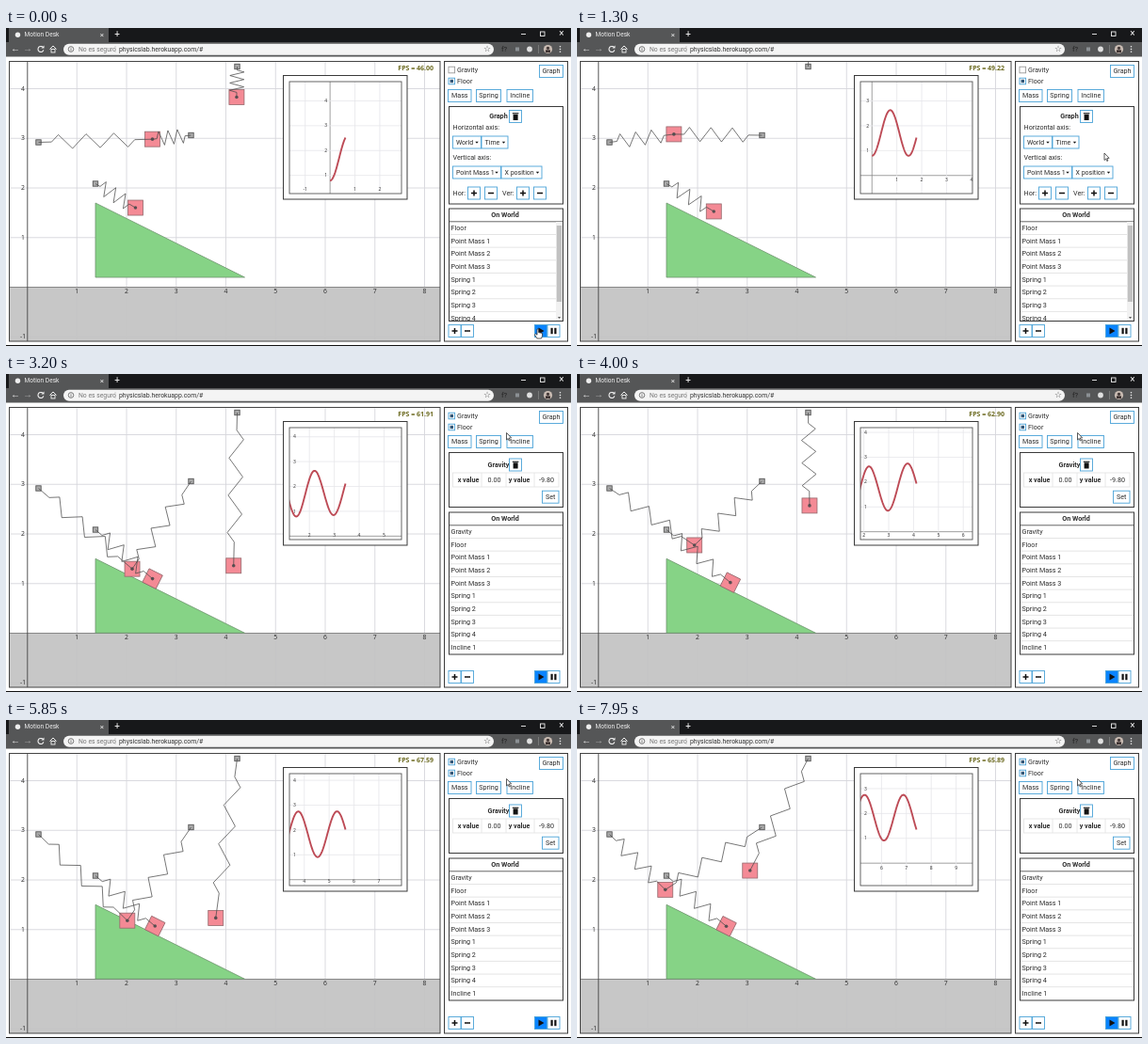
Write an HTML page with a canvas that moves like this. It is 600x338 px and loops after 8000 ms.

```html
<!DOCTYPE html>
<html lang="es">
<head>
<meta charset="utf-8">
<title>Motion Desk</title>
<style>
html, body { margin: 0; width: 100%; height: 100%; overflow: hidden; background: #fff; }
canvas { display: block; width: 600px; height: 338px; }
</style>
</head>
<body>
<canvas id="stage" width="600" height="338"></canvas>
<script>
const ctx = document.getElementById('stage').getContext('2d');
const LOOP = 8000, STEP = 50, UNIT = 52.75, GRAPH_UNIT = 26.4;
const UI = 'Roboto, sans-serif', AXIS = '"Open Sans", sans-serif';
const BLUE = '#4ba3d8', FRAME = '#3a3a3a', GRID = '#d6d6dc';
const GRAVITY_ON = 2400, FALL = 2.83;

const worldX = x => 22.5 + UNIT * x;
const worldY = y => 275.5 - UNIT * y;
const clamp = (v, lo = 0, hi = 1) => Math.min(hi, Math.max(lo, v));
const smooth = u => u * u * (3 - 2 * u);
const range = (from, to) => Array.from({ length: to - from + 1 }, (_, i) => from + i);

// Simulated seconds; the simulation slows down a little under gravity.
const clock = ms => .62 + .0009 * ms - .000067 * Math.max(0, ms - 2450);

// Smooth curve through one value per moment of the fall.
const MOMENTS = [FALL, 4.11, 4.96, 6.35, 7.41];
function through(values, t) {
  const last = MOMENTS.length - 1;
  const i = clamp(MOMENTS.findLastIndex(m => m <= t), 0, last - 1);
  const slope = k => {
    const a = Math.max(k - 1, 0), b = Math.min(k + 1, last);
    return (values[b] - values[a]) / (MOMENTS[b] - MOMENTS[a]);
  };
  const h = MOMENTS[i + 1] - MOMENTS[i], u = clamp((t - MOMENTS[i]) / h), w = 1 - u;
  return smooth(w) * values[i] + smooth(u) * values[i + 1] + u * w * h * (w * slope(i) - u * slope(i + 1));
}
const sagPhase = [.8, 4.47, 7.57, 11.67, 14.33];
const bobPhase = [.52, 4.77, 7.33, 11.89, 14.6];
const bobAngle = [-.03, .01, .243, -.53, -.48];

function swing(s) {
  const halfTurns = Math.min(1.3605 * s, .194 + 1.28 * s);
  return 1.71 + .12 * clamp((s - 2.2) / 1.6) - .92 * Math.cos(Math.PI * halfTurns);
}
function middleMass(s) {
  const drift = Math.max(0, (s - 1.8) / 1.03);
  const y = s < FALL ? 2.93 + .085 * s - .66 * drift ** 2 : 1.95 + .8 * Math.cos(through(sagPhase, s));
  return [worldX(swing(s)), worldY(y)];
}
function hangingMass(s) {
  const falling = s >= FALL, angle = falling ? through(bobAngle, s) : -.03;
  const length = falling
    ? 1.98 - 1.3 * Math.cos(through(bobPhase, s))
    : -1.55 * Math.sin(Math.PI * (s - .84) / 1.68);
  return [worldX(4.235 + length * Math.sin(angle)), worldY(4.45 - length * Math.cos(angle))];
}
function slidingMass(s) {
  const x = s < FALL
    ? 140 + 7 * Math.cos(1.94 + 3.1 * (s - .62))
    : 162 + 4 * Math.cos(3.1 * (s - 4.11) - 1.32) - 30 * Math.exp(4 * (FALL - s));
  const free = 192.3 + .5 * (x - 140), resting = 221.7 + .55 * (x - 163);
  return [x, free + (resting - free) * clamp((s - FALL) / .3)];
}

function box(x, y, w, h, fill, stroke, width = 1) {
  if (fill) { ctx.fillStyle = fill; ctx.fillRect(x, y, w, h); }
  if (stroke) { ctx.strokeStyle = stroke; ctx.lineWidth = width; ctx.strokeRect(x, y, w, h); }
}
function line(points, color, width = 1, fill) {
  ctx.beginPath();
  points.forEach(([x, y]) => ctx.lineTo(x, y));
  if (fill) { ctx.closePath(); ctx.fillStyle = fill; ctx.fill(); }
  if (color) { ctx.strokeStyle = color; ctx.lineWidth = width; ctx.stroke(); }
}
const across = (x0, x1, y, color, width) => line([[x0, y], [x1, y]], color, width);
const down = (x, y0, y1, color, width) => line([[x, y0], [x, y1]], color, width);
function dot(x, y, r, fill, stroke) {
  ctx.beginPath();
  ctx.arc(x, y, r, 0, 7);
  if (fill) { ctx.fillStyle = fill; ctx.fill(); }
  if (stroke) { ctx.strokeStyle = stroke; ctx.lineWidth = 1; ctx.stroke(); }
}
function text(s, x, y, { size = 7.2, weight = 400, align = 'left', color = '#2c2c2c', family = UI } = {}) {
  ctx.font = `${weight} ${size}px ${family}`;
  ctx.textAlign = align;
  ctx.textBaseline = 'middle';
  ctx.fillStyle = color;
  ctx.fillText(s, x, y + .3);
}
const centered = (s, x, y, style) => text(s, x, y, { align: 'center', ...style });
function clipped(x, y, w, h, draw) {
  ctx.save();
  ctx.beginPath();
  ctx.rect(x, y, w, h);
  ctx.clip();
  draw();
  ctx.restore();
}

function drawBrowser() {
  const icon = { size: 10, color: '#f2f2f2' };
  box(0, 0, 600, 15, '#17181a');
  box(3, 0, 106, 15, '#555657');
  dot(12.5, 7.2, 2.7, '#eee');
  text('Motion Desk', 19.5, 7.2, { size: 6.6, color: '#eee' });
  centered('×', 102, 7, { size: 8, color: '#eee' });
  centered('+', 118, 7, icon);
  across(547, 552, 6.5, '#eee', .9);
  box(567.5, 4, 4.5, 4.5, null, '#eee', .9);
  centered('×', 590, 6, icon);

  box(0, 15, 600, 15.5, '#555657');
  ctx.beginPath();
  ctx.roundRect(61, 16.7, 457, 12, 6);
  ctx.fillStyle = '#f4f4f4';
  ctx.fill();
  centered('←', 10, 22, icon);
  centered('→', 23, 22, { size: 10, color: '#aaa' });
  ctx.beginPath();
  ctx.arc(37, 22.5, 3, .3, 5.4);
  ctx.strokeStyle = icon.color;
  ctx.lineWidth = 1.1;
  ctx.stroke();
  line([[37.5, 21.5], [40.5, 21.5], [40.5, 18.5]], null, 1, icon.color);
  line([[46.5, 22.5], [50, 19], [53.5, 22.5]], icon.color, 1);
  box(48, 22.5, 4, 3.5, null, icon.color, .9);
  dot(69, 22.5, 2.8, null, '#777');
  down(69, 21.3, 24.2, '#777', .9);
  text('No es seguro', 77, 22.3, { size: 6.8, color: '#777' });
  down(116, 19, 26, '#bbb', .7);
  text('physicslab.herokuapp.com/#', 120, 22.3, { size: 6.9, color: '#333' });
  centered('☆', 511, 22, { size: 9, color: '#555', family: '"DejaVu Sans", sans-serif' });
  centered('f?', 529, 22.3, { size: 7.5, color: '#222' });
  box(541, 20.5, 4, 4, '#8b9094');
  dot(556, 22.5, 2.9, '#e0e0e0');
  down(565.5, 18, 27, '#888', .7);
  dot(575.5, 22.5, 4.6, '#c9bbb2');
  dot(575.5, 21.3, 1.6, '#3f3433');
  box(573, 23.3, 5, 2.8, '#3f3433');
  range(-1, 1).forEach(i => dot(588.5, 22.5 + 2.7 * i, .8, icon.color));
}

function spring([ax, ay], [bx, by]) {
  const dx = bx - ax, dy = by - ay, length = Math.hypot(dx, dy) || 1;
  const at = (f, side = 0) => [ax + dx * f - dy / length * side, ay + dy * f + dx / length * side];
  const zigzag = range(0, 5).map(i => at(.115 + .73 * (i + .5) / 6, i % 2 ? 7.5 : -7.5));
  line([at(0), at(.115), ...zigzag, at(.845), at(1)], '#4a4a4a', .75);
}
function mass([x, y], angle = 0) {
  ctx.save();
  ctx.translate(x, y);
  ctx.rotate(angle);
  box(-8, -8, 16, 16, '#f48a95', '#94686c', .8);
  ctx.restore();
  dot(x, y, 1.8, '#5b5053');
}

function drawWorld(s, frame) {
  range(1, 8).forEach(i => down(worldX(i), 36, 333, GRID, .9));
  range(-1, 4).forEach(i => across(4, 461, worldY(i), GRID, .9));
  box(4, 275.5, 457, 57.5, 'rgba(196,196,196,.94)');
  across(4, 461, 275.5, '#888');
  down(22.8, 36, 333, '#444', .9);
  const label = { size: 6.8, family: AXIS };
  range(1, 8).forEach(i => centered(i, worldX(i), 280.2, label));
  range(-1, 4).forEach(i => i && centered(i, 18, worldY(i), label));

  const base = 265 + (s < FALL ? 0 : Math.min(10.3, 258 * (s - FALL) ** 2));
  line([[95, base - 79], [253.5, base], [95, base], [95, base - 79]], '#6f936f', .8, '#86d386');

  const left = [34.5, 121.5], right = [196.5, 114], top = [245.5, 41], slope = [95, 165.5];
  const middle = middleMass(s), bob = hangingMass(s), slider = slidingMass(s);
  mass(middle);
  mass(slider, .464 * clamp((s - 2.9) / .12));
  mass(bob);
  [left, right, top, slope].forEach(([x, y]) => box(x - 2.7, y - 2.7, 5.4, 5.4, '#aaa', '#555', .9));
  spring(left, middle);
  spring(middle, right);
  spring(slope, slider);
  spring(top, bob);

  const noise = Math.abs(Math.sin(frame * 91.7) * 4375.5) % 1;
  const fps = (46 + 26 * noise).toFixed(2);
  text('FPS = ' + fps, 454, 43.2, { size: 7, weight: 700, align: 'right', color: '#6c6a20', family: AXIS });
}

// The plot keeps the newest point in its centre.
function drawGraph(s) {
  const cx = 360.5, cy = 116.5, now = swing(s);
  const px = t => cx + (t - s) * GRAPH_UNIT, py = v => cy - (v - now) * GRAPH_UNIT;
  box(294.5, 50.5, 131.5, 131.5, '#fff', FRAME);
  clipped(301, 57, 119, 119, () => {
    const label = { size: 5, family: AXIS };
    const units = range(-2, 10);
    units.forEach(i => {
      down(px(i), 57, 176, i ? '#e6e6ea' : '#888', .8);
      across(301, 420, py(i), i ? '#e6e6ea' : '#888', .8);
    });
    units.filter(i => i).forEach(i => {
      centered(i, px(i), Math.min(py(0) + 5, 171), label);
      centered(i, Math.max(px(0) - 4.5, 306.5), py(i), label);
    });
    const points = [];
    for (let t = Math.max(0, s - 2.4); t < s; t += .02) points.push([px(t), py(swing(t))]);
    line([...points, [cx, cy]], '#bd4b56', 1.9);
  });
  box(301, 57, 119, 119, null, '#555', .9);
}

function button(x, y, w, label = '', fill = '#fff') {
  box(x, y, w, 13, fill, BLUE, .9);
  centered(label, x + w / 2, y + 6.5);
}
function signButton(x, y, plus) {
  button(x, y, 13);
  const cx = x + 6.5, cy = y + 6.5;
  across(cx - 3, cx + 3, cy, '#111', 1.5);
  if (plus) down(cx, cy - 3, cy + 3, '#111', 1.5);
}
function signPair(x, y, gap) {
  signButton(x, y, true);
  signButton(x + gap, y, false);
}
function select(x, y, w, label) {
  button(x, y, w);
  text(label, x + 3.5, y + 6.5, { size: 7 });
  const ax = x + w - 4.5, ay = y + 5.7;
  line([[ax - 1.7, ay], [ax + 1.7, ay], [ax, ay + 2]], null, 1, '#111');
}
function checkbox(y, label, checked) {
  box(470, y - 3.3, 6.6, 6.6, '#fff', checked ? BLUE : '#999', .9);
  if (checked) box(471.6, y - 1.7, 3.4, 3.4, '#345878');
  text(label, 479, y);
}
function settings(title, y, h) {
  box(470.5, 83.5, 121, h, '#fff', FRAME);
  centered(title, 523, y, { weight: 700 });
  button(534.5, y - 6.5, 13);
  box(538.6, y - 2.2, 5, 6.2, '#111');
  box(537.8, y - 3.8, 6.6, 1.1, '#111');
}

function drawGraphSettings() {
  settings('Graph', 94, 103.5);
  text('Horizontal axis:', 474.5, 105.5);
  select(474.5, 115, 30, 'World');
  select(505, 115, 28, 'Time');
  text('Vertical axis:', 474.5, 137.5);
  select(474.5, 147, 51, 'Point Mass 1');
  select(526, 147, 43, 'X position');
  text('Hor:', 474.5, 175.2);
  signPair(490.5, 169, 18);
  text('Ver:', 527, 175.2);
  signPair(542.5, 169, 18);
}
function drawGravitySettings() {
  settings('Gravity', 96.5, 58);
  box(474.5, 105, 112.5, 15, null, '#e2e2e2', .8);
  [505, 531, 561].forEach(x => down(x, 105, 120, '#e2e2e2', .8));
  centered('x value', 491, 112.6, { weight: 700 });
  centered('0.00', 518.5, 112.6);
  centered('y value', 545, 112.6, { weight: 700 });
  centered('-9.80', 574, 112.6);
  button(569.5, 124.2, 17.5, 'Set');
}
function drawList(y, h, names) {
  box(470.5, y, 121, h, '#fff');
  centered('On World', 530, y + 7, { weight: 700 });
  across(470.5, 591.5, y + 13.8, '#555', .9);
  clipped(470, y, 121, h, () => names.forEach((name, i) => {
    const rowY = y + 20.7 + 13.65 * i;
    text(name, 472.5, rowY);
    if (i < names.length - 1) across(471, 591, rowY + 6.8, '#dedede', .8);
  }));
  if (h < 14 * names.length) {
    box(584, y + 14, 7, h - 14, '#f1f1f1');
    box(584.8, y + 18, 5.4, 81, '#c1c1c1');
    line([[586, y + 115], [589, y + 115], [587.5, y + 117]], null, 1, '#555');
  }
  box(470.5, y, 121, h, null, FRAME);
}

function drawPanel(gravity) {
  box(465.5, 35.5, 131, 297.5, '#fff', FRAME);
  checkbox(44.5, 'Gravity', gravity);
  checkbox(56.5, 'Floor', true);
  button(566.5, 39.5, 25, 'Graph');
  button(469.5, 65.5, 24.5, 'Mass');
  button(499.5, 65.5, 26, 'Spring');
  button(532, 65.5, 27.5, 'Incline');
  const names = ['Floor', ...range(1, 3).map(i => 'Point Mass ' + i), ...range(1, 4).map(i => 'Spring ' + i), 'Incline 1'];
  if (gravity) {
    drawGravitySettings();
    drawList(147, 151, ['Gravity', ...names]);
  } else {
    drawGraphSettings();
    drawList(192, 119.5, names);
  }
  signPair(470, 315.5, 13.5);
  button(561.5, 315.5, 13, '', '#0a84ff');
  line([[565.5, 318.5], [571.5, 322], [565.5, 325.5]], null, 1, '#111');
  button(575, 315.5, 13);
  [578.5, 582.3].forEach(x => box(x, 318.8, 2.2, 6.4, '#111'));
}

function drawCursor(t) {
  const stops = [[0, 564, 320], [900, 560, 133], [2250, 476, 44], [3100, 531.5, 62.5]];
  let [, x, y] = stops[0];
  for (const [arrival, sx, sy] of stops) {
    const u = smooth(clamp((t - arrival) / 550 + 1));
    x += (sx - x) * u;
    y += (sy - y) * u;
  }
  const hand = y > 312 || y < 52;
  const shape = hand
    ? [[0, 0], [1.6, 0], [1.6, 3.6], [5.5, 4.4], [5.5, 7.3], [4.5, 10], [0, 10], [-2.7, 6], [-1.6, 5], [0, 6.2]]
    : [[0, 0], [0, 7.5], [1.7, 6], [2.8, 8.5], [3.9, 8], [2.8, 5.5], [5.1, 5.3]];
  line([...shape, shape[0]].map(([dx, dy]) => [x + dx, y + dy]), '#333', .8, '#fff');
}

function draw() {
  const frame = Math.floor(performance.now() % LOOP / STEP), t = frame * STEP;
  const s = clock(t);
  box(0, 0, 600, 338, '#fff');
  drawBrowser();
  clipped(4, 36, 457, 297, () => drawWorld(s, frame));
  box(3.5, 35.5, 457.5, 297.5, null, '#444');
  drawGraph(s);
  drawPanel(t >= GRAVITY_ON);
  drawCursor(t);
  box(0, 337, 600, 1, '#111');
  requestAnimationFrame(draw);
}
requestAnimationFrame(draw);
</script>
</body>
</html>
```
